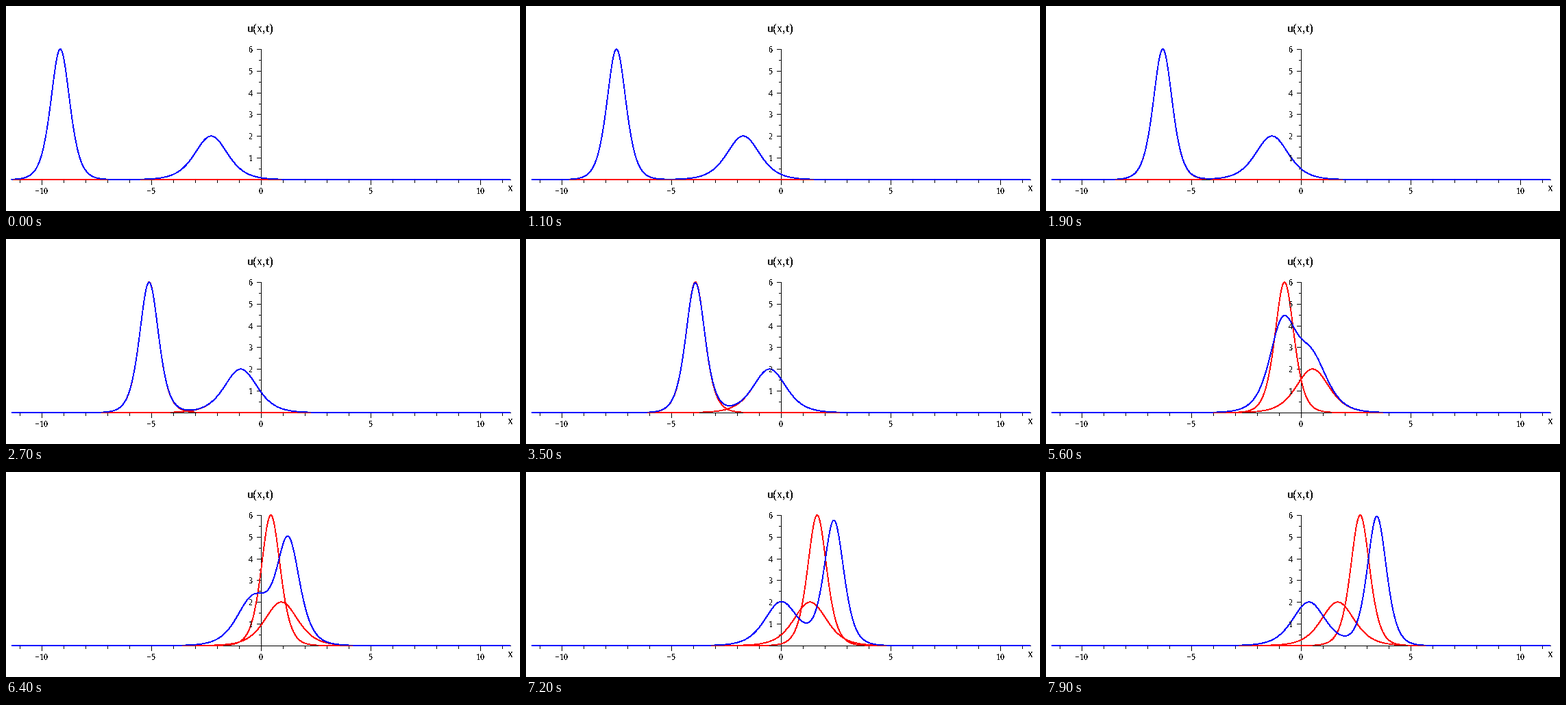
Animation, 750 px wide and 300 px high, one loop 8 s. Source, as a matplotlib script:

```python
import numpy as np
import matplotlib.pyplot as plt
from matplotlib.animation import FuncAnimation

# Two-soliton solution of the KdV equation u_t + 6 u u_x + u_xxx = 0
W, H, DPI = 750, 300, 100
FRAMES, INTERVAL = 80, 100
X0, Y0 = 372, 254            # pixel position of the plot's zero point
SX, SY = 32, 191 / 6         # pixels per unit
DT = 0.0125
K1, K2 = np.sqrt(3), 1.0
START1, START2 = -9.15, -2.27
COUPLING = ((K1 - K2) / (K1 + K2)) ** 2
SHIFT = -np.log(COUPLING) / (2 * K2)

RED, BLUE = "#ff0000", "#0000ff"
x = np.linspace(-11.375, 11.375, 729)

plt.rcParams.update({
    "font.family": "Liberation Serif",
    "text.hinting": "native",
    "text.hinting_factor": 1,
    "path.simplify": False,
})
fig = plt.figure(figsize=(W / DPI, H / DPI), dpi=DPI, facecolor="white")
ax = fig.add_axes([0, 0, 1, 1])
ax.set(xlim=(0, W), ylim=(H, 0))
ax.axis("off")


def px(pixels):
    return pixels * 72 / DPI


def label(lx, ly, text, size=13, ha="center"):
    ax.text(lx, ly, text, fontsize=px(size), ha=ha, va="baseline",
            antialiased=False)


def bar(left, top, width, height):
    ax.add_patch(plt.Rectangle((left, top), width, height, fc="black",
                               lw=0, snap=True))


def draw_axes():
    bar(8, Y0, 729, 1)
    bar(X0, 63, 1, Y0 - 63)
    for i in range(-11, 12):
        major = i % 5 == 0
        bar(X0 + SX * i, Y0, 1, 8 if major else 5)
        if major:
            label(X0 + SX * i, 275, str(i).replace("-", "\u2212"))
    for i in range(1, 13):
        major = i % 2 == 0
        length = 6 if major else 3
        y = round(Y0 - SY * i / 2)
        bar(X0 - length, y, length, 1)
        if major:
            label(360, y + 5, str(i // 2), ha="right")
    label(371.5, 38, "u(x,t)", 18)
    label(735.5, 271, "x", 18)


def soliton(k, center):
    return 2 * k**2 / np.cosh(k * (x - center)) ** 2


def two_solitons(c1, c2):
    """2 (ln F)'' for a sum of exponentials: twice the variance of the rates."""
    e1 = np.exp(2 * K1 * (x - c1))
    e2 = np.exp(2 * K2 * (x - c2 + SHIFT))
    weights = np.array([np.ones_like(x), e1, e2, COUPLING * e1 * e2])
    weights /= weights.sum(axis=0)
    rates = 2 * np.array([0, K1, K2, K1 + K2])[:, None]
    mean = (weights * rates).sum(axis=0)
    return 2 * (weights * (rates - mean) ** 2).sum(axis=0)


def curve(color):
    # Without antialiasing every touched pixel is filled: about 2 px wide
    return ax.plot([], [], color=color, lw=px(0.8), antialiased=False,
                   snap=False, solid_joinstyle="round",
                   solid_capstyle="butt")[0]


draw_axes()
fast, slow, both = curve(RED), curve(RED), curve(BLUE)


def update(n):
    t = n * DT
    c1 = START1 + 4 * K1**2 * t
    c2 = START2 + 4 * K2**2 * t
    waves = soliton(K1, c1), soliton(K2, c2), two_solitons(c1, c2)
    for line, u in zip((fast, slow, both), waves):
        line.set_data(X0 + SX * x, Y0 - SY * u)
    return fast, slow, both


anim = FuncAnimation(fig, update, frames=FRAMES, interval=INTERVAL,
                     repeat=True, repeat_delay=0, blit=False)
plt.show()
```
